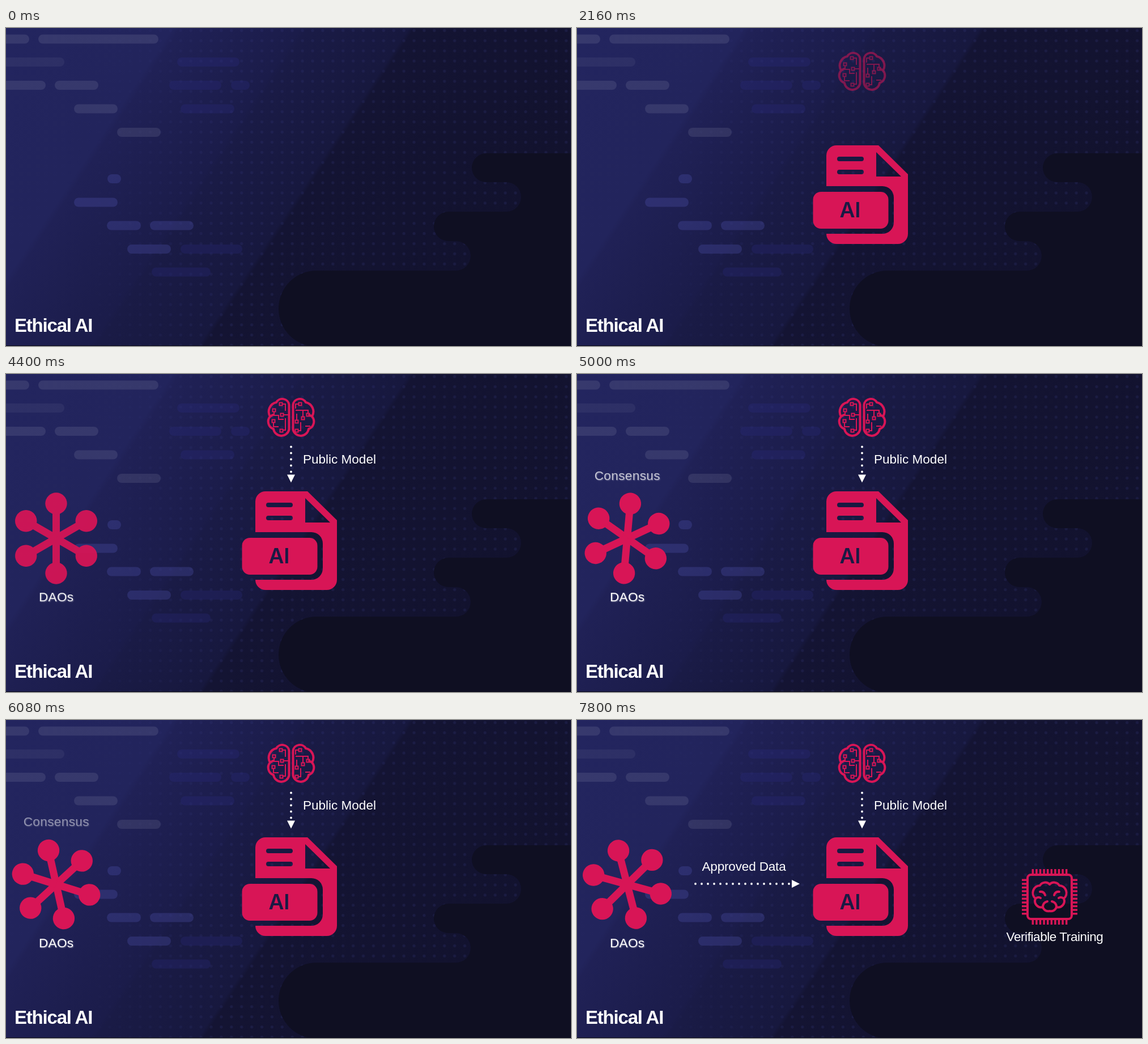
An HTML page for the animation above (8000 ms loop, 997 by 561 pixels).

```html
<!DOCTYPE html>
<html lang="en">
<head>
<meta charset="utf-8">
<title>Ethical AI</title>
<style>
  html, body { margin: 0; width: 100%; height: 100%; overflow: hidden; background: #171740; }
  svg { display: block; width: 100vw; height: 100vh; }
  text { font-family: "Liberation Sans", Arial, sans-serif; fill: #fff; }
  .label { font-size: 22.5px; text-anchor: middle; }
  .glow { text-shadow: 1px 1px 2px rgba(255, 255, 255, .45); }
  .red { fill: #d81556; }
  .line { fill: none; stroke: #d81556; stroke-width: 4; stroke-linejoin: round; stroke-linecap: round; }
  .thin { stroke-width: 2; stroke-linejoin: miter; stroke-linecap: butt; }
</style>
</head>
<body>
<svg viewBox="0 0 997 561" preserveAspectRatio="none">
  <defs>
    <linearGradient id="sky" gradientUnits="userSpaceOnUse" x1="0" y1="0" x2="950" y2="630">
      <stop offset="0" stop-color="#23255f"/>
      <stop offset=".215" stop-color="#22245c"/>
      <stop offset=".225" stop-color="#202156"/>
      <stop offset=".38" stop-color="#1b1c4a"/>
      <stop offset=".39" stop-color="#1a1b46"/>
      <stop offset=".52" stop-color="#17183e"/>
      <stop offset=".527" stop-color="#141433"/>
      <stop offset="1" stop-color="#11112b"/>
    </linearGradient>
    <linearGradient id="fade">
      <stop offset=".1" stop-color="#000"/>
      <stop offset=".4" stop-color="#fff"/>
    </linearGradient>
    <pattern id="dots" width="17.9" height="17.9" patternUnits="userSpaceOnUse">
      <circle cx="4" cy="4.5" r="2.6" fill="#34377c" opacity=".25"/>
    </pattern>
    <mask id="dotMask"><rect width="997" height="561" fill="url(#fade)"/></mask>
    <path id="lobe" d="M499.5 54A12 11.5 0 0 0 477 50A16.8 16.8 0 0 0 466 75A13.8 13.8 0 0 0 472 97A14 14 0 0 0 499.5 98ZM466 75l5-3"/>
    <path id="half" d="M834 290A10 9 0 0 0 817 292A13 13 0 0 0 809 315A11 11 0 0 0 822 330A10 10 0 0 0 834 337M817 303q7-1 9 6M809 315q5-4 9-1M822 330q0-8 8-10"/>
  </defs>

  <rect width="997" height="561" fill="url(#sky)"/>
  <rect width="997" height="561" fill="url(#dots)" mask="url(#dotMask)"/>
  <g id="pills"></g>
  <path fill="#0f0f22" d="M997 221H847.500a25.500 25.500 0 0 0 0 51H883a26 26 0 0 1 0 52H781a26 26 0 0 0 0 52H794a26 26 0 0 1 0 52H548a67 67 0 0 0 0 134H997Z"/>
  <rect y="560" width="997" height="1" fill="#0a0a1a"/>
  <text x="15" y="536" font-size="33" font-weight="bold" letter-spacing="-1.2">Ethical AI</text>

  <g id="file">
    <path class="red" fill-rule="evenodd" d="M458 207H532L584 258V363a18 18 0 0 1-18 18H458a18 18 0 0 1-18-18H539a20 20 0 0 0 20-20V299a20 20 0 0 0-20-20H440V225a18 18 0 0 1 18-18ZM528 219V262H572ZM463 227h39a4 4 0 0 1 0 8h-39a4 4 0 0 1 0-8ZM463 250h39a4 4 0 0 1 0 8h-39a4 4 0 0 1 0-8Z"/>
    <rect class="red" x="416.500" y="289" width="133" height="65" rx="14"/>
    <text x="482" y="334" text-anchor="middle" style="font:600 37px Inter,sans-serif;fill:#1a1a44">AI</text>
  </g>

  <g id="brain" class="line">
    <use href="#lobe"/>
    <use href="#lobe" transform="translate(1006) scale(-1 1)"/>
    <g id="circuit" class="thin">
      <path d="M473 67v6h8v7h9M488 53h5v12M490 72h9M472 86v7h9M488 99h5V78M516 53h-5v8M511 64h22v5M524 64v12M513 82v-12M516 100h4V85M528 92h9"/>
    </g>
  </g>
  <text id="model" class="label" x="588.500" y="158">Public Model</text>
  <g id="down" fill="#fff"></g>

  <g id="dao">
    <g id="net" class="red"></g>
    <text class="label glow" x="88.700" y="400.500" letter-spacing=".4">DAOs</text>
  </g>
  <text id="vote" class="label glow" x="88.800" y="187" letter-spacing=".4">Consensus</text>

  <text id="data" class="label" x="294.500" y="266" letter-spacing="-.15">Approved Data</text>
  <g id="right" fill="#fff"></g>

  <g id="chip">
    <g class="line">
      <rect x="795" y="273" width="78" height="78" rx="6"/>
      <use href="#half"/>
      <use href="#half" transform="translate(1668) scale(-1 1)"/>
    </g>
    <path id="pins" class="line" style="stroke-width:3.500;stroke-linecap:butt"/>
    <text class="label" x="843" y="390" letter-spacing="-.42">Verifiable Training</text>
  </g>
</svg>
<script>
const $ = id => document.getElementById(id);
const add = (id, html) => $(id).insertAdjacentHTML('beforeend', html);
const clamp = u => Math.max(0, Math.min(1, u));
const smooth = u => u * u * (3 - 2 * u);
const range = n => [...Array(n).keys()];

// Code-like bars: [left, right, centre y]
function pills(fill, bars) {
  for (const [l, r, y] of bars)
    add('pills', `<rect x="${l}" y="${y - 8}" width="${r - l}" height="16" rx="8" fill="${fill}"/>`);
}
pills('rgba(255,255,255,.09)', [[-20, 41, 19.5], [57, 269, 19.5], [-20, 70, 101], [86, 163, 101],
  [120, 197, 142.5], [196, 273, 184]]);
pills('rgba(255,255,255,.05)', [[-20, 103, 60]]);
pills('rgba(92,96,200,.24)', [[179, 203, 266], [120, 197, 307.5], [178, 238, 348.5], [254, 331, 348.5], [214, 291, 390]]);
pills('rgba(45,48,140,.22)', [[302, 412, 60], [288, 380, 101], [397, 430, 101], [308, 403, 142.5],
  [308, 417, 390], [257, 361, 430.5]]);

for (const [x, y] of [[473, 64], [485, 53], [487, 72], [472, 83], [486, 100],
  [519, 53], [524, 78], [533, 72], [513, 84], [513, 100]])
  add('circuit', `<rect x="${x - 2.5}" y="${y - 2.5}" width="5" height="5"/>`);

for (const i of range(6))
  add('net', `<g transform="translate(88.500 290) rotate(${i * 60})"><rect x="-6.500" y="-61" width="13" height="61"/><circle cy="-61.500" r="19.200"/></g>`);

$('pins').setAttribute('d', range(10).map(i => {
  const x = 804.3 + i * 6.6, y = x - 522;
  return `M${x} 263v9M${x} 352v9M785 ${y}h9M874 ${y}h9`;
}).join(''));

// Arrows run along +x in their own frame; the head pulls the dots behind it.
function arrow(id, place, count, end) {
  $(id).setAttribute('transform', place);
  for (const i of range(count)) add(id, `<circle cx="${i * 11}" r="1.900"/>`);
  add(id, '<path d="M0-7V7L14 0Z"/>');
  return u => {
    const head = -4 + (end + 4) * smooth(u);
    $(id).style.display = u > 0 ? '' : 'none';
    [...$(id).children].forEach((el, i) => {
      if (i < count) el.style.display = i * 11 < head ? '' : 'none';
      else el.setAttribute('transform', `translate(${head})`);
    });
  };
}
const down = arrow('down', 'translate(503 128.500) rotate(90)', 5, 49);
const right = arrow('right', 'translate(209 289)', 16, 170);

function draw(t) {
  const part = (start, len = 600) => clamp((t - start) / len);
  const show = (id, a) => $(id).setAttribute('opacity', a);

  show('file', part(1080));
  show('brain', part(1840));
  show('model', part(2520));
  down(part(2520));
  const tilt = -6.4 * Math.sin(part(3120) * 6 * Math.PI);
  $('file').setAttribute('transform', `rotate(${tilt} 500 294)`);

  show('dao', part(3840));
  const spin = -434.5 * smooth(part(4555, 2000));
  $('net').setAttribute('transform', `rotate(${spin} 88.5 290)`);
  show('vote', part(4560) - part(5780));

  show('data', part(6560));
  right(part(6560));
  show('chip', part(7200));
}

const begin = performance.now();
function tick() {
  const t = (performance.now() - begin) % 8000;
  draw(Math.floor(t / 40) * 40);
  requestAnimationFrame(tick);
}
tick();
</script>
</body>
</html>
```
